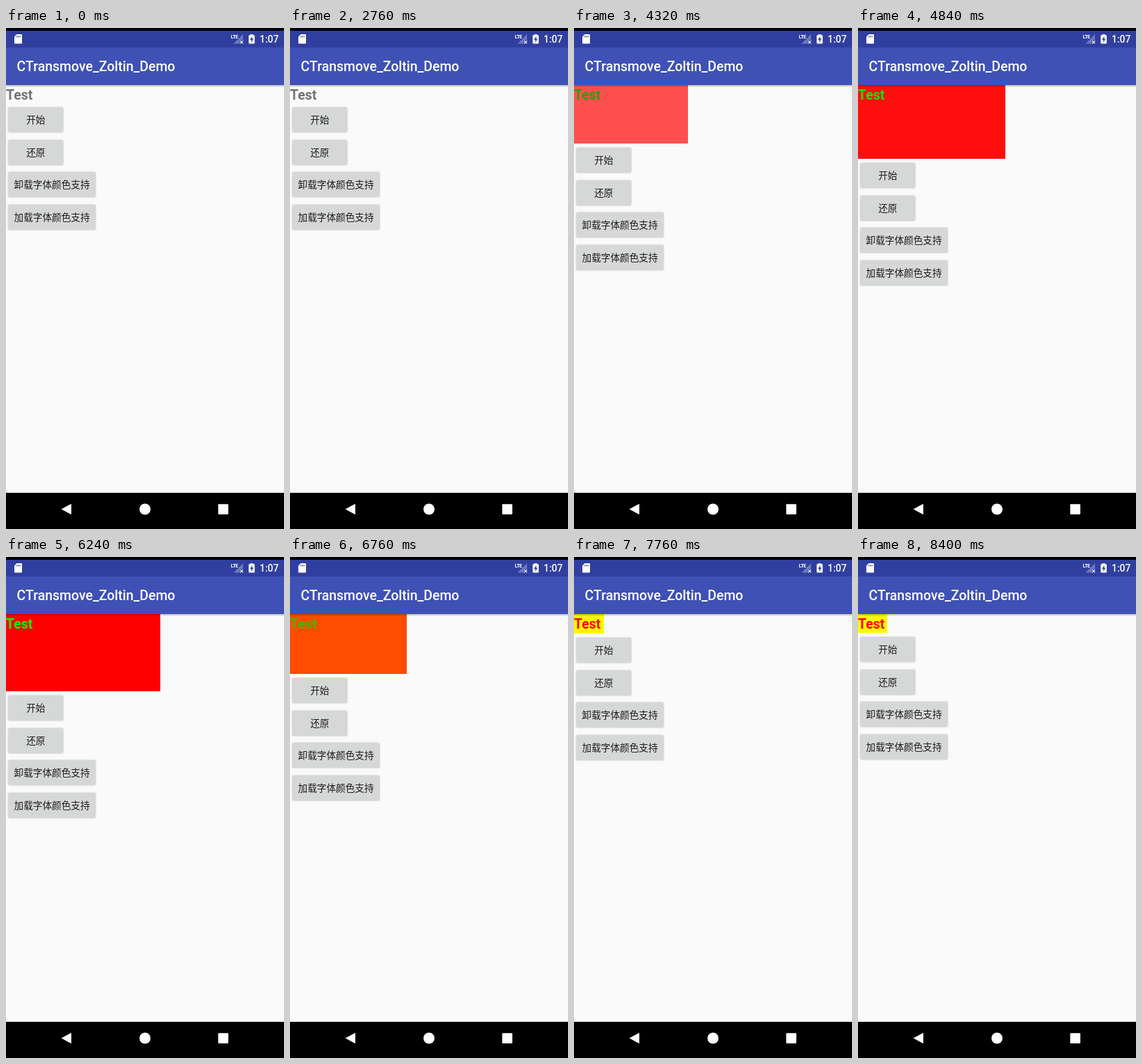
An HTML page that plays this animation: 400 by 720 pixels, repeating every 8440 ms.

```html
<!DOCTYPE html>
<html lang="zh-CN">
<head>
<meta charset="utf-8">
<title>Demo</title>
<style>
  html, body { margin: 0; width: 100%; height: 100%; overflow: hidden; background: #000; }
  svg { display: block; }
  text { font-family: Roboto, sans-serif; }
  .title { font-size: 19.45px; font-weight: 500; fill: #fff; }
  .label { font-size: 19.45px; font-weight: 700; }
  .clock { font-size: 13.8px; font-weight: 500; fill: #fff; }
  .lte { font-size: 7.2px; font-weight: 700; fill: #fff; letter-spacing: -.6px; }
  .button rect { fill: #d6d7d7; filter: drop-shadow(0 .8px .8px rgba(0, 0, 0, .25)); }
  .button text {
    font-family: "Noto Sans CJK SC", "Noto Sans CJK", sans-serif;
    font-size: 13.65px; text-anchor: middle; fill: #1c1c1c;
  }
</style>
</head>
<body>
<svg width="400" height="720" viewBox="0 0 400 720">
  <defs>
    <linearGradient id="shade" x2="0" y2="1">
      <stop stop-opacity=".25"/>
      <stop offset="1" stop-opacity="0"/>
    </linearGradient>
  </defs>

  <rect width="400" height="720"/>
  <rect y="82" width="400" height="586" fill="#fafafa"/>

  <rect id="panel" y="82"/>
  <text id="label" class="label" x="0" y="102.7">Test</text>
  <g id="buttons"></g>

  <rect y="82" width="400" height="3.5" fill="url(#shade)"/>
  <rect y="4" width="400" height="24" fill="#303f9f"/>
  <rect y="28" width="400" height="54" fill="#3f51b5"/>
  <text class="title" x="15.6" y="62.2">CTransmove_Zoltin_Demo</text>

  <!-- status icons -->
  <path d="M15.5 9H22q1 0 1 1v11.5q0 1-1 1h-9q-1 0-1-1V12.5z" fill="#fff"/>
  <path d="M15.8 11v2.5M18 11v2.5M20.2 11v2.5" stroke="#303f9f"/>
  <path d="M341 9v8.5h-4.5v5H327.5z" fill="#fff" fill-opacity=".3"/>
  <text class="lte" x="323.6" y="15.4">LTE</text>
  <path d="M337 18.3l4 4m0-4l-4 4" stroke="#fff" stroke-width="1.2"/>
  <path d="M351.5 9h4v1.2h1.5q.8 0 .8.8v10.7q0 .8-.8.8h-7q-.8 0-.8-.8V11q0-.8.8-.8h1.5z" fill="#fff"/>
  <path d="M354.3 12l-3.3 5h2v3.8l3.2-5.3h-1.9z" fill="#303f9f"/>
  <text class="clock" x="392.3" y="21" text-anchor="end">1:07</text>

  <!-- navigation -->
  <g fill="#fff">
    <path d="M80.5 691.5L93.5 684.5V698.5z" stroke="#fff" stroke-linejoin="round"/>
    <circle cx="200" cy="691.5" r="8"/>
    <rect x="305.3" y="684.3" width="14.6" height="14.6" rx="1"/>
  </g>
</svg>

<script>
  const LOOP = 8440, STEP = 40, RUN = 2000;
  const GROW = 2947, SHRINK = 6417;
  const SMALL = [40, 26.7], LARGE = [222, 111.4];
  const WHITE = [255, 255, 255, 1], RED = [255, 0, 0, 1], YELLOW = [255, 255, 0, 1];
  const GREEN = [0, 255, 0, 1], FADED = [0, 0, 0, .54], CLEAR = [255, 255, 255, 0];

  const byId = id => document.getElementById(id);
  const panel = byId("panel"), label = byId("label"), buttons = byId("buttons");

  buttons.innerHTML = ["开始", "还原", "卸载字体颜色支持", "加载字体颜色支持"].map((name, i) => {
    const width = name.length > 2 ? 125.4 : 78.8, y = 6 + Math.round(i * 46.67);
    return `<g class="button"><rect x="3.4" y="${y}" width="${width}" height="36" rx="2"/>
      <text x="${3.4 + width / 2}" y="${y + 22.8}">${name}</text></g>`;
  }).join("");

  const clamp = x => Math.min(1, Math.max(0, x));
  const mix = (a, b, p) => a.map((v, i) => v + (b[i] - v) * p);
  const rgba = c => `rgba(${c.map(v => +v.toFixed(3)).join(",")})`;

  function bounce(x) {
    const t = x * 1.1226;
    const arc = (mid, base) => 8 * (t - mid) ** 2 + base;
    if (t < .3535) return arc(0, 0);
    if (t < .7408) return arc(.54719, .7);
    if (t < .9644) return arc(.8526, .9);
    return arc(1.0435, .95);
  }

  function pose(t) {
    if (t < GROW) return { size: SMALL, fill: CLEAR, ink: FADED };
    if (t < SHRINK) {
      const p = clamp((t - GROW) / RUN);
      return { size: mix(SMALL, LARGE, p), fill: mix(WHITE, RED, p), ink: mix(FADED, GREEN, p) };
    }
    const p = bounce(clamp((t - SHRINK) / RUN));
    return { size: mix(LARGE, SMALL, p), fill: mix(RED, YELLOW, p), ink: mix(GREEN, RED, p) };
  }

  const start = performance.now();
  function draw() {
    const time = (performance.now() - start) % LOOP;
    const { size, fill, ink } = pose(Math.floor(time / STEP) * STEP);
    const [w, h] = size.map(Math.floor);
    panel.setAttribute("width", w);
    panel.setAttribute("height", h);
    panel.setAttribute("fill", rgba(fill));
    label.setAttribute("fill", rgba(ink));
    buttons.setAttribute("transform", `translate(0 ${82 + h})`);
    requestAnimationFrame(draw);
  }
  draw();
</script>
</body>
</html>
```
